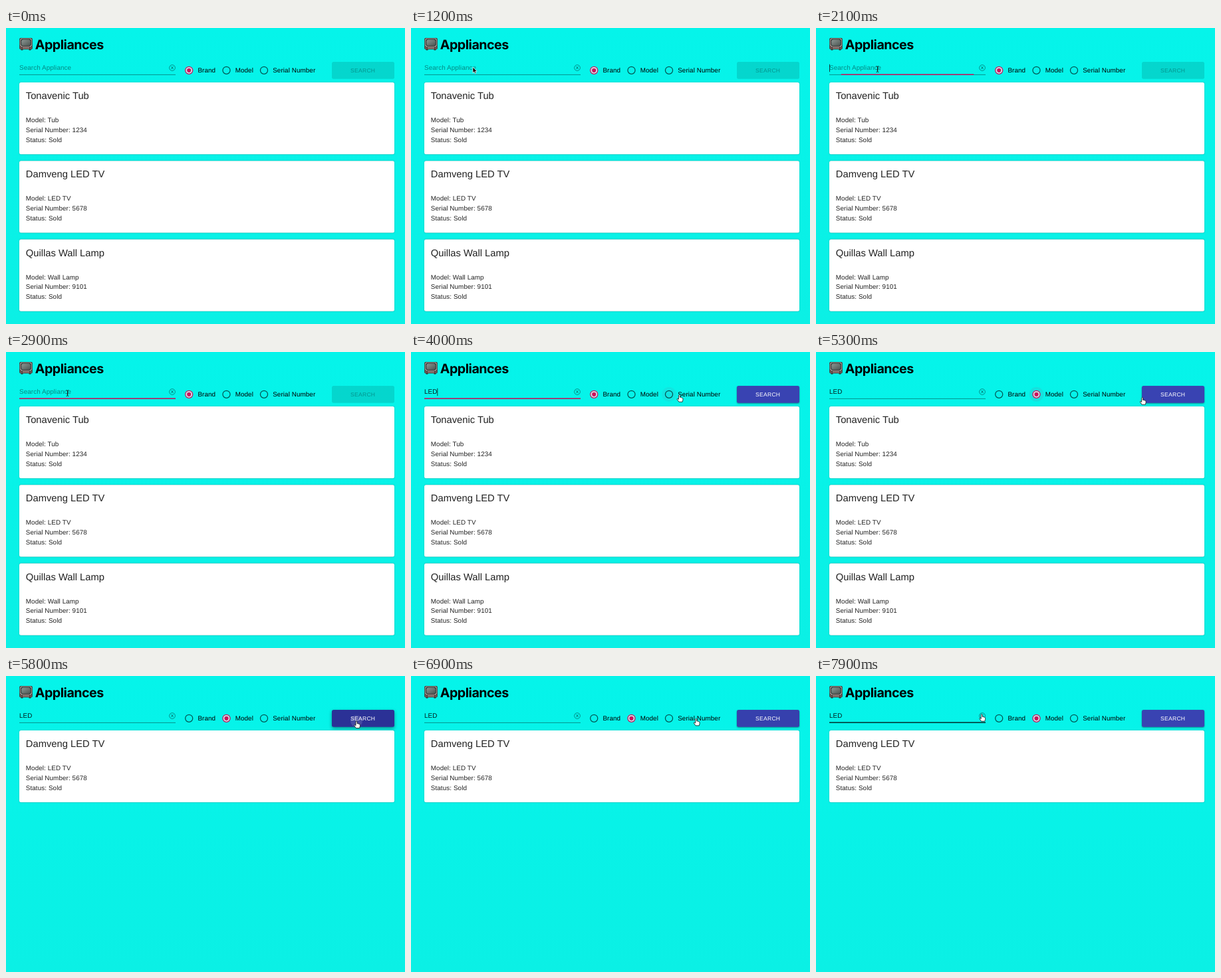
An HTML page for the animation above (8000 ms loop, 600 by 446 pixels).

```html
<!DOCTYPE html>
<html lang="en">
<head>
<meta charset="utf-8">
<title>Appliances</title>
<style>
  html, body { margin: 0; width: 100%; height: 100%; overflow: hidden; }
  body { background: linear-gradient(#05f4ea, #0bf0e5); }
  svg { display: block; }
  text { font: 9.85px "Liberation Sans", Arial, sans-serif; letter-spacing: .0094em; fill: rgba(0,0,0,.87);
    text-rendering: geometricPrecision; white-space: pre; }
  .heading { font: 700 19.66px Inter, sans-serif; letter-spacing: -.5px; fill: #000; }
  .name { font-size: 14.74px; letter-spacing: 0; }
  .label { fill: #000; }
  .button { font-size: 8.6px; letter-spacing: .0286em; }
  .card { fill: #fff; filter: drop-shadow(0 .7px .5px rgba(0,0,0,.3)) drop-shadow(0 0 .8px rgba(0,0,0,.2)); }
</style>
</head>
<body>
<svg id="stage" width="600" height="446" viewBox="0 0 600 446">
  <defs>
    <linearGradient id="glass" x1="0" y1="0" x2="1" y2="1">
      <stop offset="0" stop-color="#8d9894"/>
      <stop offset="1" stop-color="#4c5754"/>
    </linearGradient>
    <clipPath id="edge"><rect x="490" y="51" width="94" height="25.8" rx="2.5"/></clipPath>
  </defs>
</svg>
<script>
const LOOP = 8000;
const PINK = '#cc105c';
const TIMES = { enter: 900, beam: 1500, focus: 1950, keys: [3250, 3400, 3550], move: 3650, pick: 4850, search: 5700 };
const items = [
  ['Tonavenic', 'Tub', 1234],
  ['Damveng', 'LED TV', 5678],
  ['Quillas', 'Wall Lamp', 9101]
];
// Pointer hotspot: time, x, y
const path = [
  [900, 122, 120], [1120, 93, 59], [1450, 93, 59], [1550, 92.5, 62],
  [3650, 92.5, 62], [3980, 403.5, 64.2], [4120, 403.5, 64.2], [4550, 332, 63.5],
  [4980, 332, 63.5], [5290, 490.5, 68.2], [5330, 491.5, 68.2], [5580, 527, 67.5],
  [6600, 527, 67.5], [7350, 249.2, 57.2], [8000, 249.2, 57.2]
];

const stage = document.getElementById('stage');

function add(tag, attrs, parent = stage) {
  const node = document.createElementNS('http://www.w3.org/2000/svg', tag);
  set(node, attrs);
  parent.appendChild(node);
  return node;
}
function set(node, attrs) {
  for (const key in attrs) node.setAttribute(key, attrs[key]);
}
function write(x, y, str, cls = '', parent = stage) {
  const node = add('text', { x, y, class: cls }, parent);
  node.textContent = str;
  return node;
}
const box = (x, y, width, height, fill, rx = 0, parent = stage) =>
  add('rect', { x, y, width, height, fill, rx }, parent);
const show = (node, on) => { node.style.display = on ? '' : 'none'; };
const clamp = v => Math.max(0, Math.min(1, v));
const ease = v => v * v * (3 - 2 * v);
const ramp = (t, start, length) => ease(clamp((t - start) / length));
const mix = (a, b, k) => `rgb(${a.map((v, i) => Math.round(v + (b[i] - v) * k))})`;

function drawTv() {
  box(22.5, 31.5, 3, 2, '#3a2c2a', .6);
  box(34.5, 31.5, 3, 2, '#3a2c2a', .6);
  box(20.2, 15, 19.6, 17.3, '#4c3331', 1.8);
  box(21.4, 15.8, 17.2, 12.4, '#c3c3be', 2.2);
  box(22.2, 16.6, 15.6, 10.8, '#252525', 2.4);
  box(23.2, 17.5, 13.6, 9, 'url(#glass)', 2.6);
  box(21.6, 28.9, 16.8, 2.3, '#8e7b76', .5);
  for (const x of [24, 36]) add('circle', { cx: x, cy: 30, r: .9, fill: '#3a2c2a' });
}

function makeCard(i) {
  const g = add('g', { transform: `translate(0 ${118.3 * i})` });
  add('rect', { x: 20, y: 82, width: 564, height: 108.2, rx: 2.5, class: 'card' }, g);
  return {
    g,
    texts: [write(29.8, 107, '', 'name', g), ...[0, 1, 2].map(n => write(29.8, 142 + 14.75 * n, '', '', g))]
  };
}
function fillCard(card, [brand, model, serial]) {
  const lines = [`${brand} ${model}`, `Model: ${model}`, `Serial Number: ${serial}`, 'Status: Sold'];
  lines.forEach((line, i) => {
    if (card.texts[i].textContent !== line) card.texts[i].textContent = line;
  });
}

function makeRadio(cx, str) {
  const cy = 63.8;
  const halo = add('circle', { cx, cy, r: 11, fill: '#f50057', 'fill-opacity': 0 });
  const gap = add('circle', { cx, cy, r: 5.4, fill: '#cde4e8' });
  const ring = add('circle', { cx, cy, r: 5.55, fill: 'none', 'stroke-width': 1.25 });
  const dot = add('circle', { cx, cy, r: 3.1, fill: PINK });
  write(cx + 13.2, 67.2, str, 'label');
  return { cx, halo, gap, ring, dot };
}

drawTv();
write(43.8, 32, 'Appliances', 'heading');

const hint = write(20, 63.4, 'Search Appliance');
hint.setAttribute('fill-opacity', .5);
const entry = write(20, 63.4, '');
const caret = box(0, 54.7, .8, 11.4, '#111');
const rule = box(20, 69.9, 235, .8, 'rgba(0,0,0,.5)');
const focusRule = box(20, 69.4, 235, 1.5, PINK);

add('circle', { cx: 250, cy: 60, r: 4.4, fill: 'none', stroke: 'rgba(0,0,0,.55)', 'stroke-width': .7 });
add('path', { d: 'M248.2 57.8l3.6 4.2m0 -4.2l-3.6 4.2', stroke: 'rgba(0,0,0,.6)', 'stroke-width': .75 });

const radios = [makeRadio(275.2, 'Brand'), makeRadio(331.5, 'Model'), makeRadio(388, 'Serial Number')];

const button = box(490, 51, 94, 25.8, '#000', 2.5);
const flash = add('circle', { cx: 527, cy: 68, fill: '#fff' }, add('g', { 'clip-path': 'url(#edge)' }));
const caption = write(518, 67.1, 'SEARCH', 'button');

const cards = items.map((_, i) => makeCard(i));

const pointer = add('g', {});
const shapes = {
  arrow: add('path', {
    d: 'M0 0V8.6L2 6.8L3.3 9.8L4.8 9.2L3.5 6.3H6.2Z', fill: '#000', stroke: '#fff', 'stroke-width': .7
  }, pointer),
  beam: add('path', {
    d: 'M-1.8 -4.4Q0 -4.4 0 -3.4Q0 -4.4 1.8 -4.4M0 -3.4V3.4M-1.8 4.4Q0 4.4 0 3.4Q0 4.4 1.8 4.4M-1 1.2H1',
    fill: 'none', stroke: '#111', 'stroke-width': .9
  }, pointer),
  hand: add('path', {
    d: 'M-1 1Q0 -.6 1 1V4.2Q2.2 3.7 2.8 4.6Q4 4.2 4.4 5.2Q5.4 5 5.4 6.2V8.2L4.6 11H-.6L-3.2 7.4Q-3.6 6 -2.4 6.1L-1 7.2Z',
    fill: '#fff', stroke: '#111', 'stroke-width': .8, 'stroke-linejoin': 'round'
  }, pointer)
};

function pointerAt(t) {
  let i = 0;
  while (i < path.length - 2 && t >= path[i + 1][0]) i++;
  const [t0, x0, y0] = path[i], [t1, x1, y1] = path[i + 1];
  const k = ramp(t, t0, t1 - t0);
  return [x0 + (x1 - x0) * k, y0 + (y1 - y0) * k];
}
function shapeAt(t, x, y) {
  const inside = (l, top, r, b) => x >= l && x <= r && y >= top && y <= b;
  if (inside(264, 54, 466, 74) || inside(490, 51, 584, 77) || inside(244, 53, 256, 68)) return 'hand';
  return t >= TIMES.beam && inside(20, 52, 244, 71) ? 'beam' : 'arrow';
}

function drawField(t) {
  const { beam, focus, keys, pick } = TIMES;
  const typed = keys.filter(k => t >= k).length;
  entry.textContent = 'LED'.slice(0, typed);
  show(hint, !typed);

  const since = t - (typed ? keys[typed - 1] : focus);
  show(caret, t >= focus && t < pick && since % 1000 < 500);
  caret.setAttribute('x', 20 + (typed ? entry.getComputedTextLength() : 0));

  const hover = (t >= beam && t < focus) || t >= 7100;
  set(rule, hover
    ? { y: 69.4, height: 1.4, fill: 'rgba(0,0,0,.87)' }
    : { y: 69.9, height: .8, fill: 'rgba(0,0,0,.5)' });
  const w = 235 * (ramp(t, focus, 200) - ramp(t, pick, 200));
  set(focusRule, { x: 137.5 - w / 2, width: w });
}

function drawRadios(t, x, y) {
  const { pick, move } = TIMES;
  const chosen = t >= pick ? 1 : 0;
  radios.forEach((r, i) => {
    const on = i === chosen;
    show(r.gap, on);
    show(r.dot, on);
    r.ring.setAttribute('stroke', on ? PINK : 'rgba(0,0,0,.65)');
    r.dot.setAttribute('r', 3.1 * (i === 1 ? ramp(t, pick, 150) : 1));
    const near = t > move && t < 6500 && Math.hypot(x - r.cx, y - 64) < 18;
    const pulse = i === 1 && t >= pick ? .3 * clamp(1 - (t - pick) / 600) : 0;
    r.halo.setAttribute('fill-opacity', Math.max(near ? .05 : 0, pulse));
  });
}

function drawButton(t) {
  const { keys, search } = TIMES;
  const active = t >= keys[0];
  const hover = ramp(t, 5290, 250) - ramp(t, 6720, 250);
  const press = ramp(t, search - 60, 100) - ramp(t, search + 150, 250);
  button.setAttribute('fill', active ? mix([57, 67, 178], [43, 49, 150], hover) : 'rgba(0,0,0,.12)');
  button.style.filter = active
    ? `drop-shadow(0 ${1 + hover * .4 + press * .8}px ${1 + hover * .5 + press}px rgba(0,0,0,.4))`
    : 'none';
  caption.style.fill = active ? '#fff' : 'rgba(0,0,0,.3)';
  const k = clamp((t - search) / 450);
  set(flash, { r: 70 * ease(k), 'fill-opacity': k > 0 ? .16 * (1 - k) : 0 });
}

function drawCards(t) {
  const list = t < TIMES.search ? items : items.filter(item => item[1].includes('LED'));
  cards.forEach((card, i) => {
    show(card.g, i < list.length);
    if (list[i]) fillCard(card, list[i]);
  });
}

function drawPointer(t, x, y) {
  const typing = t >= TIMES.keys[0] && t < TIMES.move;
  show(pointer, t >= TIMES.enter && !typing);
  pointer.setAttribute('transform', `translate(${x} ${y})`);
  const kind = shapeAt(t, x, y);
  for (const name in shapes) show(shapes[name], name === kind);
}

function render(t) {
  const [x, y] = pointerAt(t);
  drawField(t);
  drawRadios(t, x, y);
  drawButton(t);
  drawCards(t);
  drawPointer(t, x, y);
}

const start = performance.now();
function tick() {
  render((performance.now() - start) % LOOP);
  requestAnimationFrame(tick);
}
tick();
</script>
</body>
</html>
```
